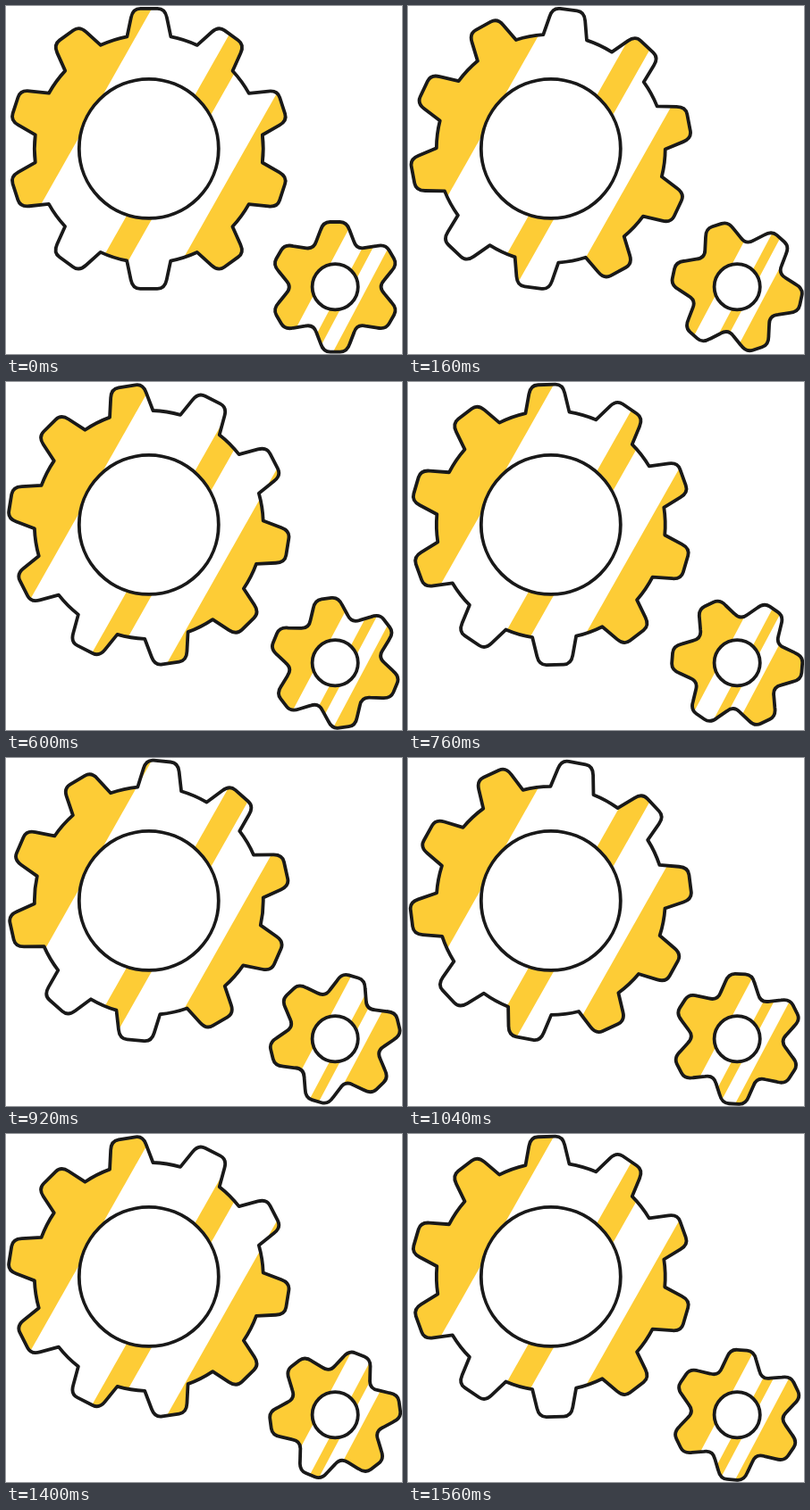
An HTML page that plays this animation: 443x390 px, repeating every 1600 ms.

```html
<!DOCTYPE html>
<html lang="en">
<head>
<meta charset="utf-8">
<title>Turning gears</title>
<style>
  html, body { margin: 0; width: 100%; height: 100%; overflow: hidden; background: #fff; }
  svg { display: block; width: 443px; height: 390px; }
  .line { fill: none; stroke: #191919; stroke-width: 3.8; stroke-linejoin: round; }
</style>
</head>
<body>
<svg id="stage" viewBox="0 0 443 390"></svg>
<script>
const LOOP = 1600;
const YELLOW = '#fdcc36';
const stage = document.getElementById('stage');

function add(parent, tag, attrs) {
  const el = document.createElementNS('http://www.w3.org/2000/svg', tag);
  for (const key in attrs) el.setAttribute(key, attrs[key]);
  parent.appendChild(el);
  return el;
}

// Each tooth is described pointing up: foot, shoulder, tip corner, tip end (right half).
function gearPath({ teeth, foot, shoulder, corner, tip, valley, root }) {
  let d = '';
  for (let i = 0; i < teeth; i++) {
    const a = i * 2 * Math.PI / teeth, c = Math.cos(a), s = Math.sin(a);
    const at = ([x, y], side = 1) => {
      x *= side;
      return (x * c - y * s).toFixed(2) + ' ' + (x * s + y * c).toFixed(2) + ' ';
    };
    // Join from the previous tooth: a curve through the valley or an arc on the root circle
    const join = root ? `A${root} ${root} 0 0 1 ` : 'Q' + at(valley, -1);
    d += (i ? join : 'M') + at(foot, -1)
      + 'L' + at(shoulder, -1) + 'Q' + at(corner, -1) + at(tip, -1)
      + 'L' + at(tip) + 'Q' + at(corner) + at(shoulder) + 'L' + at(foot);
  }
  const start = `${-foot[0]} ${foot[1]}`;
  d += root ? `A${root} ${root} 0 0 1 ${start}` : `Q${-valley[0]} ${valley[1]} ${start}`;
  return d + 'Z';
}

// Slanted band; left and right are its edges at the height of the gear's centre
function band(parent, left, right, { y, slant }) {
  const h = 200 * slant;
  add(parent, 'path', {
    d: `M${left + h} ${y - 200}H${right + h}L${right - h} ${y + 200}H${left - h}Z`,
    fill: YELLOW
  });
}

function makeGear(id, gear) {
  const d = gearPath(gear);
  const clip = add(add(stage, 'defs', {}), 'clipPath', { id });
  const mask = add(clip, 'path', { d });
  const paint = add(stage, 'g', { 'clip-path': `url(#${id})` });
  gear.bands.forEach(([left, right]) => band(paint, left, right, gear));
  add(stage, 'circle', { cx: gear.x, cy: gear.y, r: gear.hole, class: 'line', style: 'fill:#fff' });
  const rim = add(stage, 'path', { d, class: 'line' });
  return t => {
    const turn = `translate(${gear.x} ${gear.y}) rotate(${gear.spin * t})`;
    mask.setAttribute('transform', turn);
    rim.setAttribute('transform', turn);
  };
}

const gears = [
  makeGear('big', {
    x: 159.8, y: 159.9, teeth: 10, hole: 78, spin: 72, root: 128,
    foot: [24.5, -125.6], shoulder: [20, -147], corner: [18, -157], tip: [9.5, -157],
    slant: 0.565, bands: [[-300, 74.4], [177.4, 207.8], [267.8, 700]]
  }),
  makeGear('small', {
    x: 368.2, y: 314.8, teeth: 6, hole: 25.6, spin: -180,
    foot: [21, -51.2], shoulder: [16.3, -63.5], corner: [13.4, -72.8], tip: [5.5, -72.8],
    valley: [24, -41.6],
    slant: 0.53, bands: [[0, 349], [375.5, 387.3], [404.5, 700]]
  })
];

function draw(now) {
  const t = (now % LOOP) / LOOP;
  gears.forEach(turn => turn(t));
}

function tick(now) {
  draw(now);
  requestAnimationFrame(tick);
}

draw(0);
requestAnimationFrame(tick);
</script>
</body>
</html>
```
